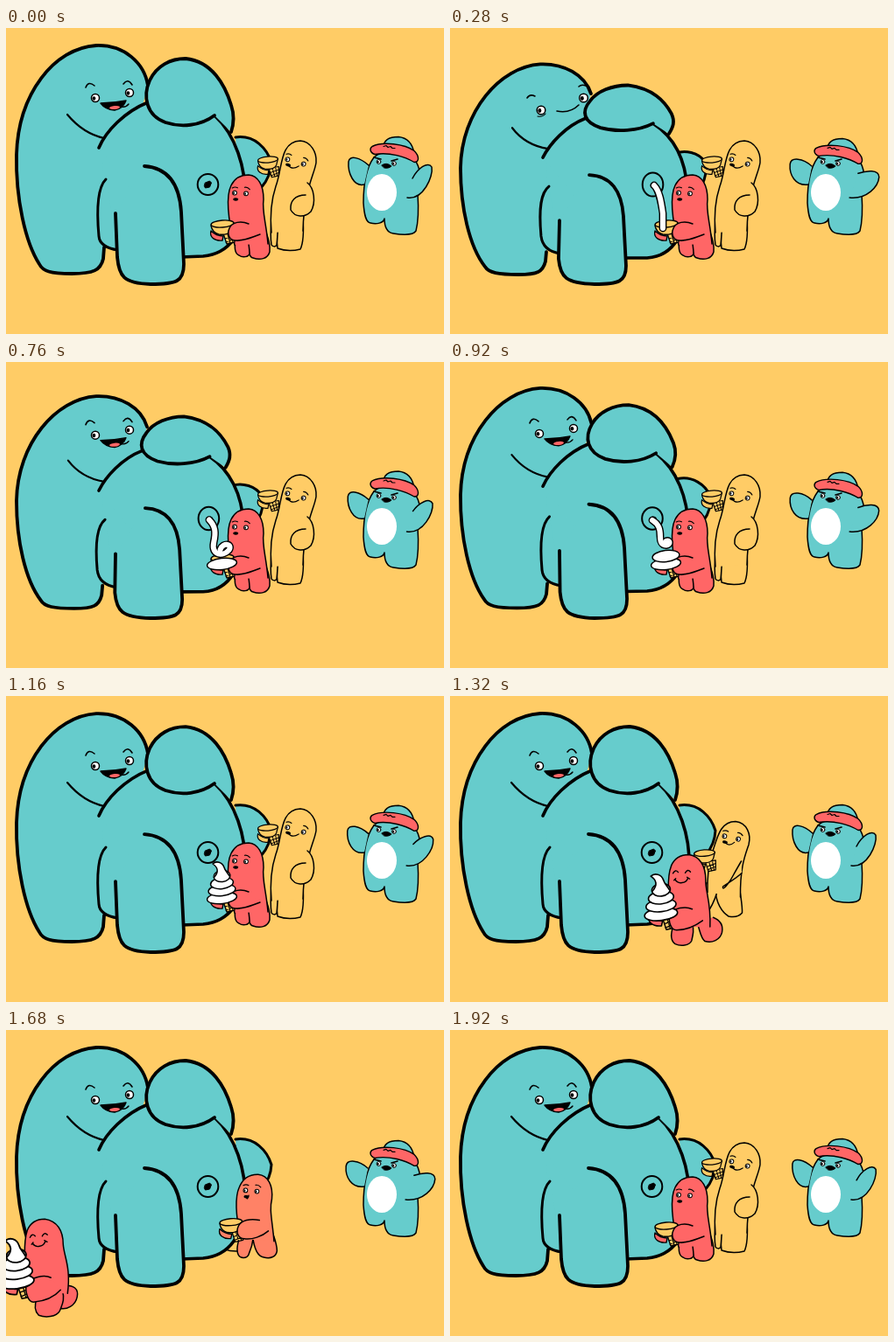
Write an HTML page with a canvas that moves like this. It is 500x350 px and loops after 1.96 s.

```html
<!DOCTYPE html>
<html lang="en">
<head>
<meta charset="utf-8">
<title>Soft serve</title>
<style>
html, body { margin: 0; width: 100%; height: 100%; overflow: hidden; background: #fc6; }
canvas { display: block; width: 500px; height: 350px; }
</style>
</head>
<body>
<canvas id="stage"></canvas>
<script>
const LOOP = 1960;
const TEAL = '#66cccc', RED = 'rgb(255,102,102)', SAND = 'rgb(255,204,102)', INK = '#000';
const canvas = document.getElementById('stage');
const ctx = canvas.getContext('2d');
const ratio = window.devicePixelRatio || 1;
canvas.width = 500 * ratio;
canvas.height = 350 * ratio;

// ---- helpers ----
const clamp = v => Math.min(1, Math.max(0, v));
const span = (t, a, b) => { const p = clamp((t - a) / (b - a)); return p * p * (3 - 2 * p); };
const lerp = (a, b, p) => a + (b - a) * p;

// Blends numbers, paths, colours, lists and whole poses.
function mix(a, b, p) {
  if (typeof a === 'number') return lerp(a, b, p);
  if (typeof a === 'string') {
    const to = b.match(/-?\d+(\.\d+)?/g);
    let i = 0;
    return a.replace(/-?\d+(\.\d+)?/g, n => lerp(+n, +to[i++], p).toFixed(2));
  }
  if (Array.isArray(a)) return a.map((v, i) => mix(v, b[i], p));
  return Object.fromEntries(Object.keys(a).map(k => [k, mix(a[k], b[k], p)]));
}

function shape(d, fill, width = 1.5, ink = INK) {
  const path = new Path2D(d);
  if (fill) { ctx.fillStyle = fill; ctx.fill(path); }
  if (width) { ctx.lineWidth = width; ctx.strokeStyle = ink; ctx.stroke(path); }
}
const line = (d, width, ink) => shape(d, null, width, ink);

function oval(x, y, rx, ry, fill, width = 1.5, angle = 0) {
  ctx.beginPath();
  ctx.ellipse(x, y, rx, ry, angle, 0, Math.PI * 2);
  if (fill) { ctx.fillStyle = fill; ctx.fill(); }
  if (width) { ctx.lineWidth = width; ctx.strokeStyle = INK; ctx.stroke(); }
}

function eye(x, y, r, look = -1) {
  oval(x, y, r, r, '#fff', r > 4 ? 1.5 : 1);
  oval(x + look * r * 0.35, y + r * 0.1, r * 0.42, r * 0.5, INK, 0);
}

function moved(x, y, draw) {
  ctx.save();
  ctx.translate(x, y);
  draw();
  ctx.restore();
}

// ---- big creature ----
const tall = {
  limb: 'M262,125 C284,122 298,138 303,154 C302,176 286,192 266,200',
  body: 'M162,66 C158,40 135,19 103,20 C55,23 14,75 12,145 C11,195 22,245 38,270 C42,278 50,281 75,281 C100,281 108,277 111,264 L112,251',
  crease: 'M70,99 C80,111 94,122 112,126',
  belly: 'M106,137 C114,118 135,96 162,85 L238,100 C262,122 274,160 273,195 C271,235 255,258 225,261 L200,262',
  hip: 'M114,173 C105,182 103,205 106,238 Q107,251 128,254',
  leg: 'M158,158 C186,160 198,180 200,210 L203,270 C203,290 195,293 165,293 C134,292 129,284 127,262 L125,212',
  lobe: 'M238,100 C222,112 200,114 182,108 C160,100 156,78 164,60 C172,43 188,35 205,35 C235,38 250,65 257,88 C261,100 260,110 257,119'
};
const squat = {
  limb: 'M258,143 C268,139 284,142 291,153 C296,172 284,192 266,200',
  body: 'M161,75 C154,53 130,40 103,41 C57,44 13,95 12,160 C12,205 22,250 40,273 C44,280 55,282 78,282 C100,282 106,279 109,267 L110,256',
  crease: 'M71,114 C80,126 94,135 112,138',
  belly: 'M106,148 C114,132 132,112 155,103 L232,109 C255,124 269,150 271,185 C271,235 255,261 225,263 L200,263',
  hip: 'M113,181 C104,188 101,205 104,238 Q106,255 126,258',
  leg: 'M159,168 C184,169 196,187 198,215 L201,272 C201,290 193,293 165,293 C132,292 126,285 124,264 L125,220',
  lobe: 'M232,109 C215,118 190,119 172,114 C152,107 150,95 160,83 C168,72 185,65 203,65 C232,69 245,83 253,98 C257,107 255,113 250,121'
};

function squeeze(t) {
  if (t < 600) return 1.12 * (1 - Math.pow(1 - clamp((t - 20) / 580), 4));
  return 1.12 * (1 - span(t, 600, 1180));
}

function grin(k) {
  moved(0, 4 * k, () => {
    line('M91,68 Q94,60 101,66 M134,64 Q139,57 144,65', 1.6);
    eye(102, 80, 4.5);
    eye(141, 74, 4.5);
    shape('M108,86 Q122,86 137,83 Q134,92 124,94 Q113,93 108,86 Z', INK, 1.4);
    oval(124, 91, 6, 2, RED, 0, -0.1);
    line('M132,90 Q137,91 140,87', 1.4);
  });
}

function smile() {
  line('M88,80 Q91,75 97,78 M147,67 Q150,64 155,66', 1.6);
  eye(104, 94, 4.8);
  eye(152.5, 80, 4.8);
  line('M100,101 Q106,102 109,98', 1.1);
  line('M122,95 Q137,98 147,88', 1.6);
}

function strain() {
  line('M95,86 Q102,83 108,85 M146,73 Q150,69 154,69', 1.6);
  shape('M94,98 Q100,91 109,93 Q105,99 94,98 Z', '#fff', 1.3);
  shape('M147,83 Q152,78 159,78 Q156,83 147,83 Z', '#fff', 1.3);
  line('M127,97 C123,89 130,84 136,86 C141,90 139,97 134,98 M129,93 Q132,89 135,92', 1.5);
}

function creature(t, k) {
  const p = mix(tall, squat, k);
  shape(p.limb, TEAL, 3);
  shape(p.body, TEAL, 3.8);
  shape('M113,250 L110,150 L165,112 L240,125 L203,260 Z', TEAL, 0);
  shape(p.belly, TEAL, 3.6);
  shape(p.hip, TEAL, 3);
  shape(p.leg, TEAL, 3.8);
  line(p.crease, 2.2);
  if (t < 120 || t >= 760) grin(k);
  else if (t < 440) smile();
  else strain();
  shape(p.lobe, TEAL, 3.8);

  moved(230.5 + k, 179, () => {
    oval(0, 0, 11.8, 12 + 1.5 * k, TEAL, 2);
    if (t < 120 || t >= 1080) shape('M-3,-2 L2,-4 L4,-2 L2,3 L-3,4 L-4,2 Z', INK, 1);
    else oval(1, 1, 4, 3.5, INK, 0);
  });
}

// ---- small figures ----
// face: x, y, eye spread, tilt, smile width; cup: x, y, scale
const front = {
  torso: 'M261,248 C253,218 251,192 257,180 C261,172 268,168 277,168 C288,169 294,180 294,196 C292,210 297,222 299,247',
  legA: 'M276,240 C277,250 276,262 282,263 C290,266 299,264 301,256 C302,248 300,242 297,234',
  legB: 'M263,240 C260,250 261,258 266,260 C270,263 277,262 278,258 C278,252 277,248 276,240',
  arm: 'M277,224 C268,220 258,222 255,229 C252,236 255,243 262,243 C270,244 280,240 290,236',
  face: [267.5, 189, 6.5, 0.06, 0], cup: [247, 237, 1], color: RED
};
const leaving = {
  torso: 'M210,280 C205,244 205,220 209,208 C213,198 221,195 229,195 C243,197 250,208 250,224 C251,238 259,250 255,280',
  legA: 'M240,275 C246,285 248,292 252,297 C260,299 270,294 272,284 C274,275 268,270 257,271',
  legB: 'M214,285 C211,293 211,300 216,305 C224,308 236,307 240,300 C243,292 246,288 243,276',
  arm: 'M236,262 C228,258 214,262 208,268 C206,278 210,290 216,290 C228,289 240,284 247,276',
  face: [222, 214, 7, -0.1, 0], cup: [197, 274, 1.2], color: RED
};
const waiting = {
  torso: 'M303,234 C301,212 303,196 308,181 C316,160 312,130 336,129 C348,130 355,142 354,154 C352,168 340,185 339,232',
  legA: 'M310,218 C309,235 309,245 310,252 C318,255 328,255 336,253 C340,245 340,232 339,216',
  legB: 'M303,215 C302,230 302,242 303,248 C304,250 308,251 309,248 C310,240 310,232 311,220',
  arm: 'M344,177 C352,183 354,200 348,210 C341,217 330,217 325,208 C324,198 330,191 342,191',
  face: [330.5, 153, 9.5, 0.28, 12], cup: [299, 162, 0.88], color: SAND
};
const stepping = {
  torso: 'M285,215 C286,195 287,190 290,180 C294,165 304,157 316,158 C330,160 333,174 328,186 C322,196 322,206 324,228',
  legA: 'M296,225 C298,238 312,250 326,252 C333,252 334,247 331,243 C328,236 324,230 322,222',
  legB: 'M283,212 C275,225 268,240 264,251 C262,259 269,260 274,255 C284,248 293,240 299,228',
  arm: 'M321,201 C308,203 295,206 292,212 C288,220 292,228 298,228 C310,230 324,226 324,214',
  face: [312, 171, 6.5, 0.15, 9], cup: [282, 221, 0.95], color: SAND
};

// Draws in the space of the front cup, moved to where the cup is held.
function atCup([x, y, s], draw) {
  ctx.save();
  ctx.translate(x, y);
  ctx.scale(s, s);
  ctx.translate(-247, -237);
  draw();
  ctx.restore();
}

function cup(color) {
  shape('M248,235 L252,247 L261,245 L261,233 Z', SAND, 1.3);
  line('M250,241 L261,237 M251,245 L261,241 M253,236 L256,246 M257,235 L259,245', 1.1);
  shape('M234,226 C235,231 238,235 243,236 C250,237 256,235 258,231 L260,223', SAND, 1.4);
  oval(247, 224, 13, 4, SAND, 1.4, -0.08);
  shape('M234,232 C232,239 238,244 247,243 L248,238 C242,238 238,236 234,232 Z', color, 1.4);
}

function smallFace([x, y, gap, tilt, grinWidth], shut) {
  ctx.save();
  ctx.translate(x, y);
  ctx.rotate(tilt);
  if (shut) {
    line('M-10,1 Q-7,-4 -4,0 M4,1 Q7,-4 10,0', 1.4);
    line('M-8,8 Q-5,13 0,12 Q5,12 7,7 M-9,9 L-7,7 M6,6 L9,8', 1.4);
  } else {
    const mouth = -gap * 0.75, low = 10.5 - gap / 2;
    eye(-gap, 0, 2.4);
    eye(gap, 0, 2.4);
    line(`M${-gap - 3},-5.5 Q${-gap},-7.5 ${-gap + 3},-6 M${gap - 2},-7 Q${gap + 1},-8 ${gap + 4},-5`, 1.2);
    oval(mouth, low, 3, 1.7, INK, 0);
    if (grinWidth > 1) line(`M${mouth},${low} q${grinWidth / 2},5 ${grinWidth},-2`, 1.2);
  }
  ctx.restore();
}

function figure(p, { swing = 0, cupBehind = false, shut = false, cream } = {}) {
  const held = () => atCup(p.cup, () => cup(p.color));
  if (cupBehind) held();
  moved(swing, 0, () => shape(p.legA, p.color));
  moved(-swing, 0, () => shape(p.legB, p.color));
  shape(p.torso, p.color);
  smallFace(p.face, shut);
  if (!cupBehind) held();
  shape(p.arm, p.color);
  if (cream) atCup(p.cup, cream);
}

// ---- soft serve ----
const spout = 'M232,180 C232,180 232,180 232,180 C232,180 232,180 232,180 C232,180 232,180 232,181';
const pour = 'M233,180 C239,186 241,198 243,212 C243,218 243,223 243,226 C243,227 243,228 243,229';
const streams = [
  [120, spout],
  [240, pour],
  [320, pour],
  [600, 'M233,180 C240,190 239,200 234,213 C227,241 256,236 263,221 C266,207 245,209 242,225'],
  [900, 'M231,181 C239,186 240,192 240,200 C240,206 242,210 247,210 C253,209 251,203 247,205'],
  [1080, 'M231,181 C238,184 240,190 240,196 C239,200 241,205 245,206 C250,206 250,203 247,203']
];
// y, half width, start of growth
const layers = [[231, 17, 620], [222, 15.5, 740], [214, 13, 920], [206, 9.5, 1000]];

function cream(t) {
  for (const [y, r, start] of layers) {
    const g = span(t, start, start + 110);
    if (g > 0) oval(246.5, y, r * g, 6.5 * g, '#fff', 1.5, -0.12);
  }
  if (t >= 1080) {
    shape('M238,207 C243,201 242,196 236,192 C240,188 247,190 249,196 C250,200 253,202 255,206', '#fff', 1.5);
  } else if (t > 120) {
    const i = streams.findIndex(([at]) => at > t);
    const [a, from] = streams[i - 1], [b, to] = streams[i];
    const d = mix(from, to, (t - a) / (b - a));
    line(d, 8.8);
    line(d, 6, '#fff');
  }
}

// ---- onlooker with hat ----
const armsUp = [
  'M414,157 C404,148 392,145 391,153 C390,166 397,182 409,179',
  'M464,172 C470,160 482,152 486,159 C488,170 476,197 458,194'
];
const armsDown = [
  'M413,158 C403,149 389,147 388,156 C387,168 394,181 409,179',
  'M466,166 C476,163 490,162 490,171 C489,182 476,196 456,194'
];

function onlooker(t) {
  const wave = (1 - Math.cos(t / LOOP * 6 * Math.PI)) / 2;
  shape('M420,148 C411,160 408,180 408,200 C409,215 411,222 416,223 C423,225 431,223 432,218 C432,230 436,234 442,235 C455,237 465,237 468,232 C471,220 471,205 470,190 C474,175 474,160 466,150 C455,140 430,138 420,148 Z', TEAL);
  for (const arm of mix(armsUp, armsDown, wave)) shape(arm, TEAL);
  oval(429, 188, 17, 21, '#fff', 0);
  eye(425.5, 153, 2.4);
  eye(443, 155, 2.4);
  line('M420,148 L428,150 M440,152 L447,150', 1.6);
  shape('M429,157 Q434,153 440,158 Q437,161 432,160 Z', INK, 1);
  moved(0, 2 * wave - 0.5, () => {
    shape('M431,137 C431,128 438,125 448,125 C458,126 464,132 466,144 Z', TEAL);
    shape('M418,136 C430,130 455,133 466,141 C472,147 472,154 466,154 C456,148 438,142 421,145 C415,143 415,138 418,136 Z', RED, 1.4);
    line('M431,136 L434,135 L436,137 L439,136 L441,138 L444,138', 1.2);
  });
}

// ---- queue ----
function walker(t) {
  const p = clamp((t - 1160) / 600);
  if (p >= 1) return;
  const w = span(t, 1180, 1440);
  const x = -370 * Math.pow(p, 3.18) + 50 * w;
  const y = 69 * (1 - Math.pow(1 - p, 1.236)) - 42 * w;
  const swing = 7 * w * Math.sin((t - 1480) / 240 * 2 * Math.PI);
  moved(x, y, () => figure(mix(front, leaving, w), { swing, shut: w > 0.5, cream: () => cream(t) }));
}

function next(t) {
  const go = span(t, 1200, 1440), settle = span(t, 1530, 1760);
  const pose = mix(mix(waiting, stepping, go), front, settle);
  figure(pose, { cupBehind: go < 0.5 });
}

function newcomer(t) {
  const come = span(t, 1560, 1820);
  const hop = 4 * Math.abs(Math.sin(come * 2 * Math.PI));
  moved(-110 * (1 - come), -hop, () => figure(waiting, { cupBehind: true }));
}

function render(t) {
  ctx.setTransform(ratio, 0, 0, ratio, 0, 0);
  ctx.lineCap = ctx.lineJoin = 'round';
  ctx.fillStyle = SAND;
  ctx.fillRect(0, 0, 500, 350);
  const arrived = t >= 1800;
  if (t > 1560 && !arrived) newcomer(t);
  creature(t, squeeze(t));
  onlooker(t);
  if (arrived) newcomer(t);
  next(t);
  walker(t);
}

const start = performance.now();
function tick() {
  const t = (performance.now() - start) % LOOP;
  render(Math.floor(t / 40) * 40);
  requestAnimationFrame(tick);
}
tick();
</script>
</body>
</html>
```
